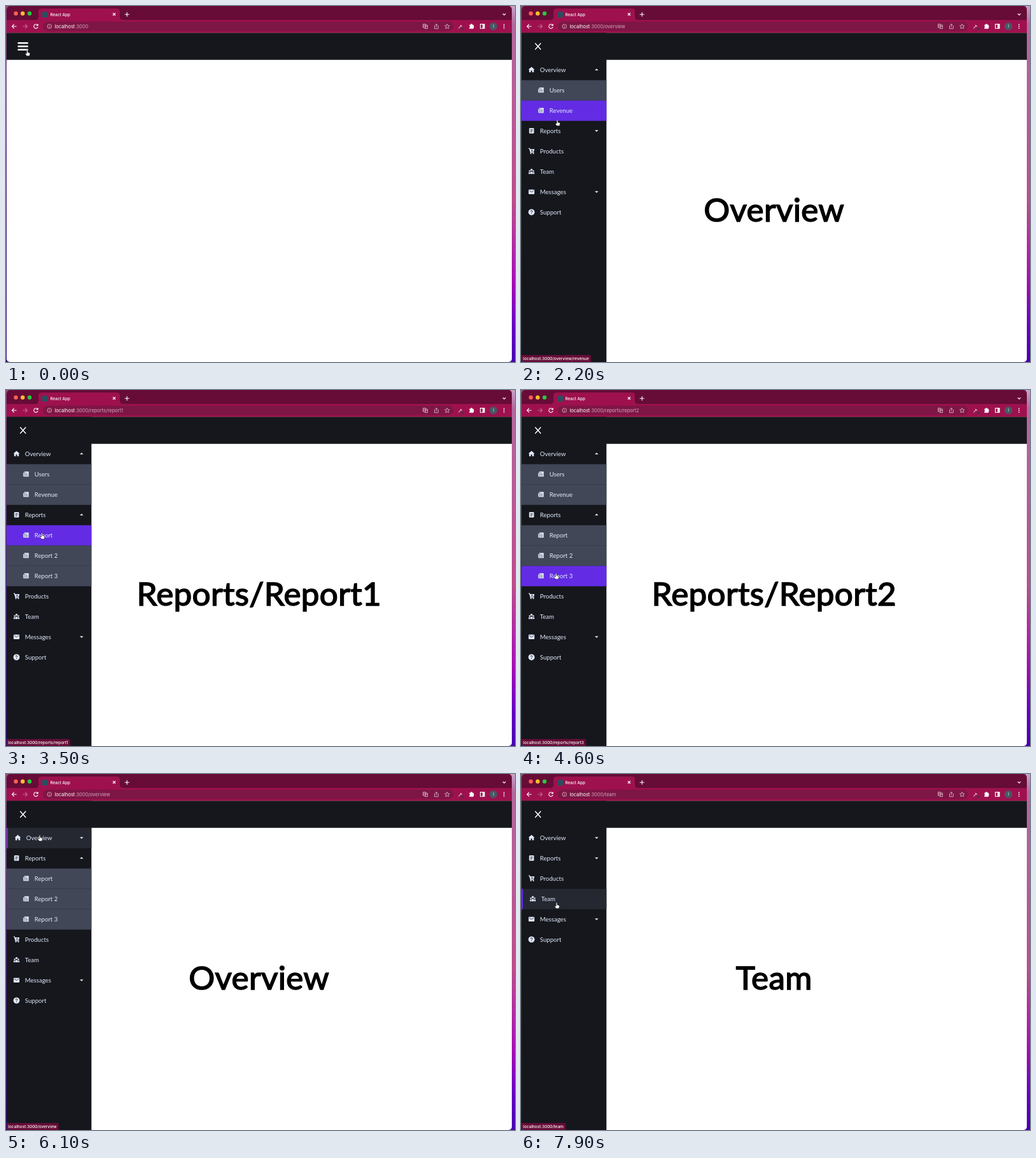
These frames come from a looping animation (800 by 560 pixels, 8000 ms). An HTML page:

```html
<!DOCTYPE html>
<html lang="en">
<head>
<meta charset="utf-8">
<title>Sidebar navigation</title>
<style>
  html, body { margin: 0; width: 800px; height: 560px; overflow: hidden; }
  svg { display: block; }
  .ui { font-family: Inter, sans-serif; fill: #fff; }
  .nav { font: 9.6px Lato, sans-serif; fill: #e1e9fc; }
  #page { font: 51.2px Lato, sans-serif; letter-spacing: .35px; stroke: #000; stroke-width: 1.6px; }
  .line { fill: none; stroke: #fff; stroke-width: 1.1; }
</style>
</head>
<body>
<svg width="800" height="560" viewBox="0 0 800 560">
  <defs>
    <linearGradient id="right" x2="0" y2="1">
      <stop stop-color="#c7a3cb"/><stop offset=".05" stop-color="#b4699f"/>
      <stop offset=".55" stop-color="#bd4d8c"/><stop offset=".78" stop-color="#a40cb8"/>
      <stop offset=".9" stop-color="#6500c4"/><stop offset="1" stop-color="#4600b0"/>
    </linearGradient>
    <linearGradient id="left" x2="0" y2="1">
      <stop stop-color="#8a4a84"/><stop offset=".5" stop-color="#4a1d78"/><stop offset="1" stop-color="#2c0d70"/>
    </linearGradient>
    <clipPath id="window"><rect x="1" width="794" height="560" rx="5"/></clipPath>

    <g id="home"><path d="M0-4.6 4.8-.2H3.7V4H1V1.3H-1V4H-3.7V-.2H-4.8Z"/></g>
    <g id="paper"><rect x="-3.7" y="-4.2" width="7.6" height="8.4" rx="1"/>
      <path d="M-1.9-1.9H2M-1.9 0H2M-1.9 1.9H.6" stroke="#15171c" stroke-width=".8"/></g>
    <g id="cart"><path d="M-4.6-4.2H-3L-1.5 2.2H4" fill="none" stroke="#e1e9fc" stroke-width="1.1"/>
      <path d="M-3-3.3H4.6L3.6 1.2H-1.9Z"/><circle cx="-1" cy="3.8" r="1"/><circle cx="3" cy="3.8" r="1"/>
      <path d="M.8-2.6V.4M-.7-1.1H2.3" stroke="#15171c" stroke-width=".7"/></g>
    <g id="people"><circle cy="-2.7" r="1.7"/><circle cx="-2.9" cy="-.8" r="1.2"/><circle cx="2.9" cy="-.8" r="1.2"/>
      <path d="M-2.1 4V1.4Q0-1.7 2.1 1.4V4ZM-4.6 4V1.8Q-3.8.6-2.6 1.1V4ZM4.6 4V1.8Q3.8.6 2.6 1.1V4Z"/></g>
    <g id="mail"><rect x="-4.6" y="-3.6" width="9.2" height="7.2" rx=".9"/>
      <path d="M-3.7-2.2 0 .4 3.7-2.2" fill="none" stroke="#15171c" stroke-width=".8"/></g>
    <g id="help"><circle r="4.9"/>
      <path d="M-1.4-1.1Q-1.3-2.6 0-2.6T1.4-1.2Q1.4-.4.6 0T0 1.3M0 2.1V3" fill="none" stroke="#15171c" stroke-width=".9"/></g>
    <g id="news"><path d="M-4.4-2.4H-2.8V-4H4.2V4H-3.4Q-4.4 4-4.4 3Z"/>
      <path d="M-2.6-3V3.2M-1.2-2H.9M-1.2 0H2.8M-1.2 2H2.8" stroke="#414757" stroke-width=".7"/></g>
    <path id="hand" d="M-.9.8Q0-.6.9.8V3.9L3.4 4.5Q4.5 5 4.3 6.4L3.6 9.6H-.8L-2.9 6.5Q-2.6 5.1-.9 6Z"/>
    <path id="arrow" d="M0 0V8.4L2 6.7 3.3 9.7 4.7 9 3.4 6.2H6Z"/>
  </defs>

  <rect width="400" height="560" fill="url(#left)"/>
  <rect x="400" width="400" height="560" fill="url(#right)"/>

  <g clip-path="url(#window)">
    <rect width="800" height="560" fill="#fff"/>
    <rect width="800" height="23" fill="#660c36"/>
    <rect y="22" width="800" height="20.5" fill="#9e114e"/>
    <path d="M46 22Q51 22 51 17V9Q51 4 56 4H174Q179 4 179 9V17Q179 22 184 22Z" fill="#9e114e"/>
    <rect x="58" y="24.5" width="645" height="15" rx="7.5" fill="#7e1645"/>
    <circle cx="15.5" cy="11.7" r="3.2" fill="#ff5f57"/>
    <circle cx="26.2" cy="11.7" r="3.2" fill="#febc2e"/>
    <circle cx="37" cy="11.7" r="3.2" fill="#28c840"/>
    <rect x="57" y="9" width="9" height="9" fill="#27505f"/>

    <g class="ui">
      <text x="69.5" y="15.7" font-size="6.4" font-weight="500">React App</text>
      <text x="76.5" y="34.7" font-size="7.45">localhost<tspan id="url" fill="#d3a6bb"></tspan></text>
    </g>

    <g class="line">
      <path d="M168 11 172 15M172 11 168 15M186.7 13.3H193.7M190.2 9.8V16.8M780.7 12 783 14.3 785.3 12"/>
      <path d="M16.5 32H9.7M12.8 28.7 9.5 32 12.8 35.3"/>
      <path d="M26.5 32H33.3M30.2 28.7 33.5 32 30.2 35.3" stroke="#c16a90"/>
      <path d="M49.6 30.2A3.2 3.2 0 1 0 50 33M50.2 28.3V30.8H47.6"/>
      <g stroke="#e4c3d1" stroke-width=".8">
        <circle cx="68.3" cy="32" r="3.3"/><path d="M68.3 31.5V34M68.3 30V30.7"/>
        <path d="M655.5 28.5H659.5V34H655.5ZM659.5 30H662.5V35.5H658.5L658 34M656.5 32.5 657.5 29.8 658.5 32.5M660 32H662"/>
        <path d="M674.5 31H673.5V35.6H679.3V31H678.3M676.4 33.5V28.3M674.7 29.9 676.4 28.2 678.1 29.9"/>
        <path d="M693.3 28.3 694.4 30.8 697 31 695 32.8 695.6 35.5 693.3 34.1 691 35.5 691.6 32.8 689.6 31 692.2 30.8Z"/>
      </g>
      <path d="M711.3 35.2 715.3 31.2M714.2 30 716.7 32.5" stroke="#d9c5ce"/>
      <path d="M745.5 28.6H752V35.2H745.5Z"/>
    </g>
    <circle cx="718" cy="36" r="2" fill="#4a3140"/>
    <g fill="#fff">
      <path d="M728.3 29.4H730.3A1.3 1.3 0 0 1 732.9 29.4H734.8V31.3A1.3 1.3 0 0 1 734.8 33.8V35.8H728.3V33.8A1.3 1.3 0 0 0 728.3 31.3Z"/>
      <path d="M749 28.6H752V35.2H749Z"/>
      <circle cx="782.7" cy="29.2" r=".9"/><circle cx="782.7" cy="32" r=".9"/><circle cx="782.7" cy="34.8" r=".9"/>
    </g>
    <circle cx="766" cy="32" r="6" fill="#455a64"/>
    <text class="ui" x="766" y="34.3" font-size="6.4" text-anchor="middle">I</text>

    <text id="page" x="397.7" y="338.5" text-anchor="middle"></text>
    <rect y="42.3" width="800" height="42.4" fill="#15171c"/>
    <path d="M19.5 58.3H33.8M19.5 63.5H33.8M19.5 68.7H33.8" stroke="#fff" stroke-width="2.4" stroke-linecap="round"/>

    <g id="sidebar" class="nav">
      <rect y="42.3" width="134.3" height="518" fill="#15171c"/>
      <path class="line" style="stroke-width:1.5" d="M22.2 58.6 31.2 68.6M31.2 58.6 22.2 68.6"/>
      <g id="rows"></g>
    </g>
    <g id="status" class="ui">
      <path fill="#660c36"/>
      <text x="3.3" y="556.8" font-size="6.4" font-weight="500"></text>
    </g>
  </g>
  <use id="cursor" fill="#fff" stroke="#222" stroke-width=".6"/>
</svg>

<script>
const LOOP = 8000, TICK = 100, TOP = 85, ROW = 32;
const $ = id => document.getElementById(id);

const menu = [
  ['Overview', 'home', [['Users', 'users'], ['Revenue', 'revenue']]],
  ['Reports', 'paper', [['Report', 'report1'], ['Report 2', 'report2'], ['Report 3', 'report3']]],
  ['Products', 'cart'],
  ['Team', 'people'],
  ['Messages', 'mail', []],
  ['Support', 'help']
];

// [time, path]
const clicks = [
  [1400, '/overview'], [2800, '/reports'], [3400, '/reports/report1'], [4100, '/reports/report2'],
  [4800, '/reports/report3'], [5900, '/overview'], [6800, '/reports'], [7900, '/team']
];

// [time, x, y] of the pointer tip
const pointer = [
  [0, 33.3, 69], [600, 33.3, 69], [700, 39, 76], [900, 39, 76], [1000, 47, 90], [1100, 49.2, 98.3],
  [1800, 49.2, 98.3], [1900, 51.5, 106], [2000, 51.5, 106], [2100, 54, 145], [2200, 57, 179],
  [2300, 58, 186], [2500, 56, 193], [3000, 56, 193], [3300, 56.5, 222], [3400, 56.5, 225],
  [3500, 56.5, 225], [3900, 55, 256], [4200, 55, 258], [4600, 55, 288], [4900, 55, 288],
  [5500, 56.5, 119], [5600, 55.3, 110], [5700, 53, 96], [6200, 53, 96], [6600, 60, 130],
  [7400, 60, 130], [7700, 56, 202], [LOOP, 56, 202]
];

function pointerAt(t) {
  const i = pointer.findIndex(key => key[0] > t);
  const [t0, x0, y0] = pointer[i - 1], [t1, x1, y1] = pointer[i];
  const k = (t - t0) / (t1 - t0);
  return [x0 + (x1 - x0) * k, y0 + (y1 - y0) * k];
}

// CSS "ease": cubic-bezier(.25, .1, .25, 1)
function ease(p) {
  const bezier = (a, b, u) => 3 * a * u * (1 - u) ** 2 + 3 * b * u * u * (1 - u) + u ** 3;
  let low = 0, high = 1;
  for (let i = 0; i < 20; i++) {
    const mid = (low + high) / 2;
    if (bezier(.25, .25, mid) < p) low = mid; else high = mid;
  }
  return bezier(.1, 1, low);
}

function visibleRows(open) {
  return menu.flatMap(([label, icon, subs]) => {
    const path = '/' + label.toLowerCase();
    const item = { label, icon, path, subs, open: open.has(path) };
    const children = item.open ? subs.map(([name, slug]) =>
      ({ label: name, icon: 'news', path: path + '/' + slug, child: true })) : [];
    return [item, ...children];
  });
}

function rowMarkup(row, i, hover) {
  const y = TOP + ROW * i, indent = row.child ? 15 : hover ? 2 : 0;
  const box = (fill, width) => `<rect y="${y - .3}" width="${width}" height="${ROW}" fill="${fill}"/>`;
  let back = '', caret = '';
  if (row.child) back = box(hover ? '#632ce4' : '#414757', 134.3);
  else if (hover) back = box('#252831', 134.3) + box('#632ce4', 3);
  if (row.subs) caret = `<path d="M116 ${y + 14.2}h5.6l-2.8 2.8z"` +
    (row.open ? ` transform="matrix(1 0 0 -1 0 ${2 * y + 30.4})"` : '') + '/>';
  return back + caret + `<use href="#${row.icon}" x="${16.5 + indent}" y="${y + 15.3}"/>` +
    `<text x="${29.8 + indent}" y="${y + 19.4}">${row.label}</text>`;
}

function draw(t) {
  const open = new Set();
  let path = '/';
  for (const [time, target] of clicks) {
    if (time > t) break;
    path = target;
    if (!open.delete(path)) open.add(path);
  }
  for (const p of open) if (!menu.some(m => m[2] && '/' + m[0].toLowerCase() === p)) open.delete(p);

  const slide = ease(Math.min(1, Math.max(0, (t - 50) / 350)));
  const [x, y] = pointerAt(t);
  const rows = visibleRows(open);
  const hovered = t >= 400 ? rows[Math.floor((y - TOP) / ROW)] : undefined;

  $('sidebar').setAttribute('transform', `translate(${-794 * (1 - slide)})`);
  $('rows').innerHTML = rows.map((row, i) => rowMarkup(row, i, row === hovered)).join('');
  $('url').textContent = ':3000' + (path === '/' ? '' : path);
  $('page').textContent = path.slice(1).split('/').map(s => s.charAt(0).toUpperCase() + s.slice(1)).join('/');

  const [bubble, label] = $('status').children;
  label.textContent = hovered ? 'localhost:3000' + hovered.path : '';
  const right = hovered ? label.getComputedTextLength() + 6.6 : 0;
  bubble.setAttribute('d', hovered ? `M0 549H${right - 2}q2 0 2 2V560H0Z` : '');

  $('cursor').setAttribute('href', y > 70 && y < TOP ? '#arrow' : '#hand');
  $('cursor').setAttribute('transform', `translate(${x} ${y})`);
}

const start = performance.now();
let shown = -1;
function frame() {
  const t = Math.floor((performance.now() - start) % LOOP / TICK) * TICK;
  if (t !== shown) draw(shown = t);
  requestAnimationFrame(frame);
}
frame();
</script>
</body>
</html>
```
